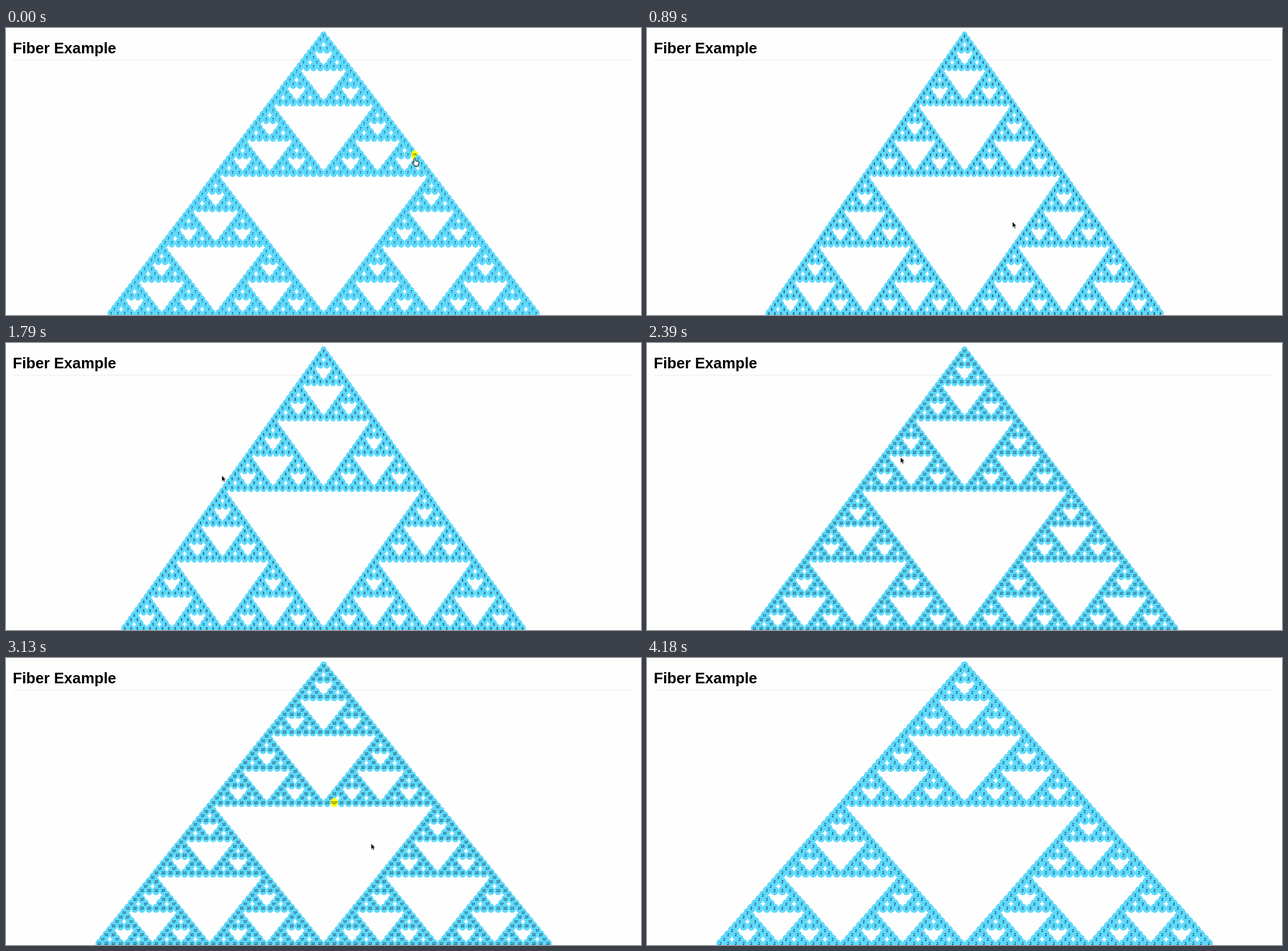
An HTML page with a canvas for the animation above (4280 ms loop, 1078 by 487 pixels).

```html
<!DOCTYPE html>
<html lang="en">
<head>
<meta charset="utf-8">
<title>Fiber Example</title>
<style>
  html, body { margin: 0; width: 100%; height: 100%; overflow: hidden; background: #fefefe; }
  h1 {
    position: absolute; left: 11.5px; top: 20px; margin: 0;
    font: bold 25.7px/29px "Liberation Sans", Arial, sans-serif;
    color: #000; white-space: nowrap;
  }
  .rule { position: absolute; left: 12px; top: 54px; width: 1052px; height: 1px; background: #eaeaea; }
  canvas { position: absolute; left: 0; top: 0; display: block; }
</style>
</head>
<body>
<h1>Fiber Example</h1>
<div class="rule"></div>
<canvas id="stage" width="1078" height="487"></canvas>
<script>
const LOOP = 4280, STEP = 150, OFFSET = 20;
const CENTER = 539.1, TOP = 13.4, ROW = 7.48;
const UNIT = 15.625, RADIUS = 16.1; // dot grid and dot size before scaling
const BLUE = '#5ed9fd', YELLOW = '#ffff00';

// Pointer path: time, tip x, tip y
const PATH = [
  [0, 694, 221], [280, 721, 259], [430, 718, 265], [1180, 555.5, 371.5],
  [1780, 366.5, 225], [2230, 380, 200], [2380, 430.5, 194],
  [2980, 557, 245], [3130, 620, 315], [3580, 730, 510]
];

const ctx = document.getElementById('stage').getContext('2d');
const hand = new Path2D('M-1.3 .6Q0-1 1.3 .6V4.6L6 5.4Q7.3 5.9 7.1 8L5.8 11V13.2H-1V11.4L-4.3 8Q-4.6 6.4-3 6.8L-1.3 8.2Z');
const arrow = new Path2D('M0 0V9.4L2.2 7.4L3.7 10.8L5.3 10.1L3.8 6.8H6.7Z');

// Sierpinski triangle: odd entries of Pascal's triangle
const dots = [];
for (let row = 0; row < 64; row++)
  for (let c = 0; c <= row; c++)
    if ((row & c) === c) dots.push({ row, col: 2 * c - row });

// Half the distance between neighbours: shrinks, then grows at the same rate
const spread = t => 5.09 * (1 + Math.abs(t - 1250) / 10000);

// Counts 1 to 10 and wraps
const counter = t => (6 + Math.floor((t + 785) / 990)) % 10 + 1;

function pointer(t) {
  const i = PATH.findIndex(k => k[0] > t);
  const [, x, y] = PATH.at(i - 1 < 0 ? -1 : i - 1);
  if (i < 0) return { x, y };
  const [start] = PATH[i - 1], [end, nextX, nextY] = PATH[i];
  const p = (t - start) / (end - start);
  return { x: x + (nextX - x) * p, y: y + (nextY - y) * p };
}

// The dot nearest to the pointer, if the pointer is inside it
function hit(t) {
  const { x, y } = pointer(t);
  const col = (x - CENTER) / spread(t), row = (y - TOP) / ROW;
  let best = RADIUS / UNIT, found = null;
  for (const d of dots) {
    const dist = Math.hypot(col - d.col, row - d.row);
    if (dist < best) { best = dist; found = d; }
  }
  return found;
}

function drawDots(t, hovered) {
  const label = String(counter(t));
  ctx.save();
  ctx.translate(CENTER, TOP);
  ctx.scale(spread(t) / UNIT, ROW / UNIT);
  ctx.font = '15px "Liberation Sans", Arial, sans-serif';
  ctx.textAlign = 'center';
  for (const d of dots) {
    const x = d.col * UNIT, y = d.row * UNIT, on = d === hovered;
    ctx.fillStyle = on ? YELLOW : BLUE;
    ctx.beginPath();
    ctx.arc(x, y, RADIUS, 0, 2 * Math.PI);
    ctx.fill();
    ctx.fillStyle = '#000';
    ctx.fillText(on ? `*${label}*` : label, x, y + 5);
  }
  ctx.restore();
}

function drawPointer(t) {
  const { x, y } = pointer(t);
  const over = hit(t);
  const shape = over ? hand : arrow;
  ctx.save();
  ctx.translate(x, y);
  ctx.lineJoin = 'round';
  ctx.strokeStyle = over ? '#000' : '#fff';
  ctx.fillStyle = over ? '#fff' : '#000';
  ctx.shadowColor = 'rgba(0,0,0,.25)';
  ctx.shadowBlur = 2;
  ctx.shadowOffsetY = 1;
  ctx.fill(shape);
  ctx.shadowColor = 'transparent';
  ctx.lineWidth = over ? 1 : .5;
  ctx.stroke(shape);
  ctx.restore();
}

function draw(t) {
  ctx.clearRect(0, 0, 1078, 487);
  // Highlighting lags one step behind the pointer
  drawDots(t, hit(Math.max(0, t - STEP)));
  drawPointer(t);
}

let shown = -1;
function tick() {
  const now = performance.now() % LOOP;
  const t = Math.max(0, Math.floor((now + OFFSET) / STEP) * STEP - OFFSET);
  if (t !== shown) draw(shown = t);
  requestAnimationFrame(tick);
}
tick();
</script>
</body>
</html>
```
